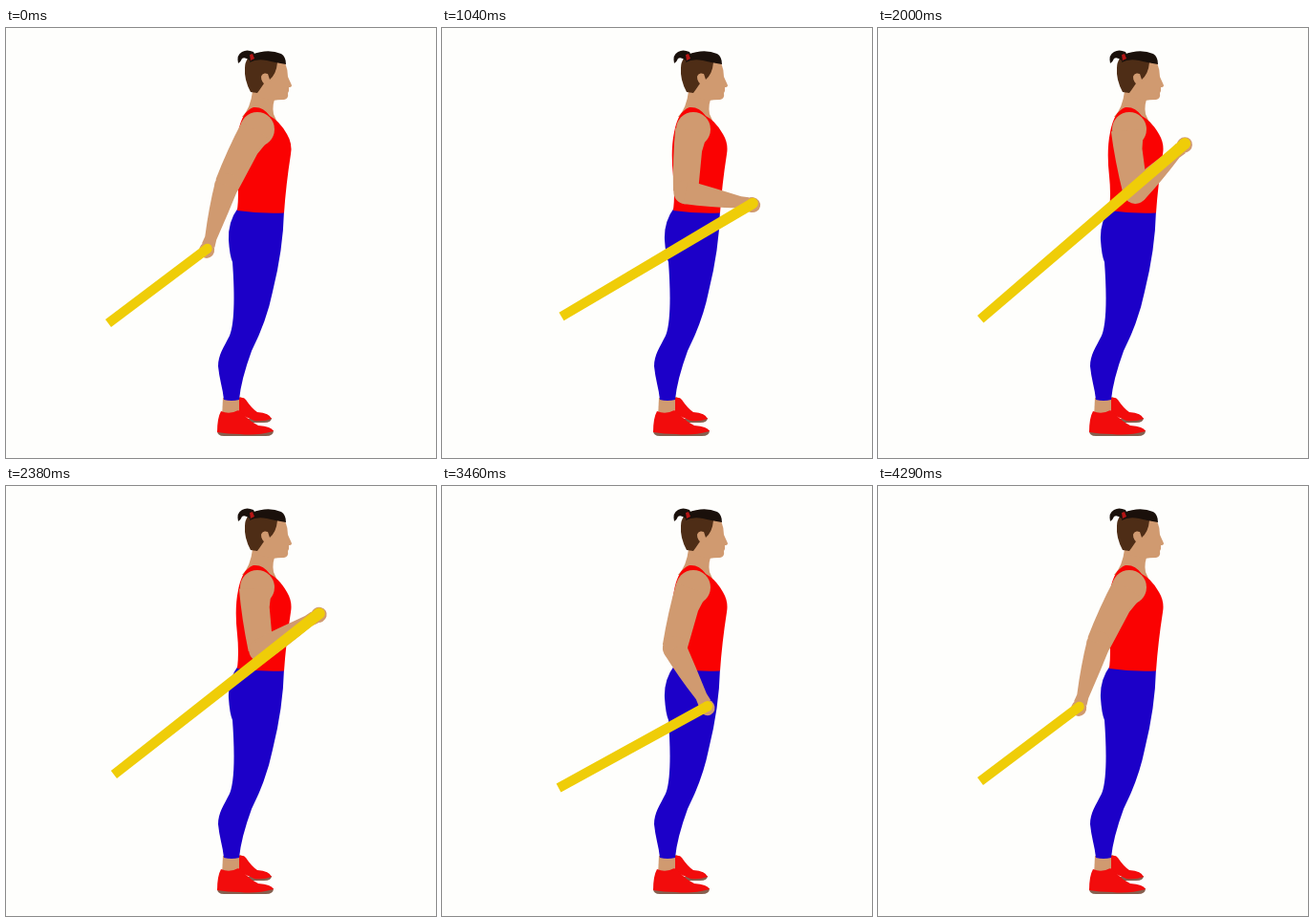
Animation of 450x450 px, one loop 4.33 s. Source, as an HTML page:

```html
<!DOCTYPE html>
<html lang="en">
<head>
<meta charset="utf-8">
<title>Resistance band curl</title>
<style>
  html, body { margin: 0; width: 100%; height: 100%; overflow: hidden; background: #fefefc; }
  svg { display: block; width: 100vw; height: 100vh; }
  .skin { fill: #d09a70; }
  .red { fill: #fa0202; }
  .shoe { fill: #f20c0c; }
  .sole { fill: #86604f; }
  .pants { fill: #1c00c8; }
  .hair { fill: #4e2d16; }
  .dark { fill: #1a100b; }
  .band { fill: #efcd08; }
</style>
</head>
<body>
<svg viewBox="0 0 450 450">
  <!-- far foot -->
  <path class="skin" d="M238 386H246L250 400H238Z"/>
  <path class="sole" d="M252 409L278 408Q278 413 270 413L256 413Z"/>
  <path class="shoe" d="M244 387Q249 386 251 389Q257 398 263 402Q276 403 278 409Q270 412 260 411L244 404Z"/>

  <!-- near foot -->
  <path class="skin" d="M227 387H243L242 408H226Z"/>
  <path class="sole" d="M221 421L280 421Q280 427 272 427H228Q221 427 221 421Z"/>
  <path class="shoe" d="M225 401Q234 405 243 400Q247 401 250 406Q256 412 264 416Q278 417 280 422Q262 427 245 425Q232 425 221 423Q221 408 225 401Z"/>

  <!-- neck and head -->
  <path class="skin" d="M257 64L283 70Q278 80 280 90L285 101L262 96L247 93Q256 84 258 66Z"/>
  <path class="skin" d="M258 40Q272 30 292 36Q295 44 295 51L299 60Q299 62 296 62L296 66L295 68Q296 74 291 75Q284 75 279 76L262 72Z"/>
  <path class="hair" d="M253 32Q262 26 280 33L284 36Q283 48 276 54L274 48Q269 46 267 51Q268 57 270 58Q266 64 263 68L256 67Q249 54 250 42Q250 36 253 32Z"/>
  <path class="skin" d="M268 49Q272 46 274 50Q274 55 270 57Q266 54 268 49Z"/>
  <path class="dark" d="M257 28Q274 21 288 27Q293 30 293 38Q281 36 273 34Q262 32 255 36Z"/>
  <path class="dark" d="M243 37Q241 28 247 25Q252 22 259 25L262 31L255 34Q250 30 247 32Q246 35 243 37Z"/>
  <path d="M255 28L258 27L260 32L256 34Z" fill="#b51515"/>

  <!-- body -->
  <path class="pants" d="M243 188Q232 203 233 222Q234 238 237 245C239 272 240 308 234 322C228 334 222 342 222 354C223 366 227 378 228 389Q236 391 244 389Q246 368 257 338Q273 306 279 276Q290 232 291 191Z"/>
  <path class="red" d="M243 109Q247 87 259 83Q269 82 276 92Q286 97 294 111Q300 121 298 132Q293 164 291 193.5Q266 194.5 242 191Q244 174 242 155Q239 128 243 109Z"/>
  <circle class="skin" cx="263" cy="106" r="18"/>

  <g id="upper" class="skin">
    <path d="M-17 -2Q-17 30 -13 64H13Q13 40 13 20L17 0Z"/>
    <circle cy="64" r="12.5"/>
    <g id="fore">
      <path d="M-12.5 0Q-11 28 -6 58L-7 66H7L6.5 58Q10 28 12.5 0Z"/>
      <ellipse cy="71" rx="8" ry="8.5"/>
    </g>
  </g>

  <path id="band" class="band"/>
  <circle id="grip" class="band"/>
</svg>
<script>
const LOOP = 4330, FPS = 24, FRAMES = 104;
const SHOULDER = [261, 108], UPPER = 64, FORE = 71;

// time, upper arm angle, forearm angle (from straight down), free band end x, y
const POSES = [
  [0, -28, -17, 107, 309],
  [580, -16, 26, 121, 316],
  [1040, -5.5, 79, 125, 302],
  [1580, 6.5, 127, 111, 304],
  [1930, 7.5, 134, 107, 305],
  [2380, 5, 121, 113, 302],
  [3000, -6, 76.5, 125, 303],
  [3460, -16, 28.5, 122, 316],
  [4310, -28, -17, 107, 309]
];

const el = id => document.getElementById(id);
const rad = a => a * Math.PI / 180;

// Tangent at a key, flat at the ends and at turning points
function slope(i, c) {
  const a = POSES[i - 1], b = POSES[i], d = POSES[i + 1];
  if (!a || !d) return 0;
  if ((b[c] - a[c]) * (d[c] - b[c]) <= 0) return 0;
  return (d[c] - a[c]) / (d[0] - a[0]);
}

function poseAt(t) {
  t = Math.min(t, POSES[POSES.length - 1][0]);
  let i = 0;
  while (i < POSES.length - 2 && t > POSES[i + 1][0]) i++;
  const a = POSES[i], b = POSES[i + 1], span = b[0] - a[0];
  const u = (t - a[0]) / span, v = 1 - u;
  return [1, 2, 3, 4].map(c =>
    v * v * (1 + 2 * u) * a[c] + u * u * (3 - 2 * u) * b[c] +
    span * u * v * (v * slope(i, c) - u * slope(i + 1, c)));
}

function drawBand(x0, y0, x1, y1) {
  const len = Math.hypot(x1 - x0, y1 - y0);
  const nx = -(y1 - y0) / len, ny = (x1 - x0) / len;
  const near = 4.3 + len * 0.006, far = 5;
  const at = (x, y, w) => `${x + nx * w} ${y + ny * w}`;
  el('band').setAttribute('d',
    `M${at(x0, y0, far)}L${at(x1, y1, near)}L${at(x1, y1, -near)}L${at(x0, y0, -far)}Z`);
  const grip = el('grip');
  grip.setAttribute('cx', x1);
  grip.setAttribute('cy', y1);
  grip.setAttribute('r', near);
}

function draw(now) {
  const frame = Math.floor((now % LOOP + 5) * FPS / 1000) % FRAMES;
  const [up, fore, x, y] = poseAt(frame * 1000 / FPS);
  el('upper').setAttribute('transform', `translate(${SHOULDER}) rotate(${-up})`);
  el('fore').setAttribute('transform', `translate(0 ${UPPER}) rotate(${up - fore})`);
  const hx = SHOULDER[0] + UPPER * Math.sin(rad(up)) + FORE * Math.sin(rad(fore));
  const hy = SHOULDER[1] + UPPER * Math.cos(rad(up)) + FORE * Math.cos(rad(fore));
  drawBand(x, y, hx + 0.5, hy - 1.5);
}

const start = performance.now();
function tick() {
  draw(performance.now() - start);
  requestAnimationFrame(tick);
}
tick();
</script>
</body>
</html>
```
